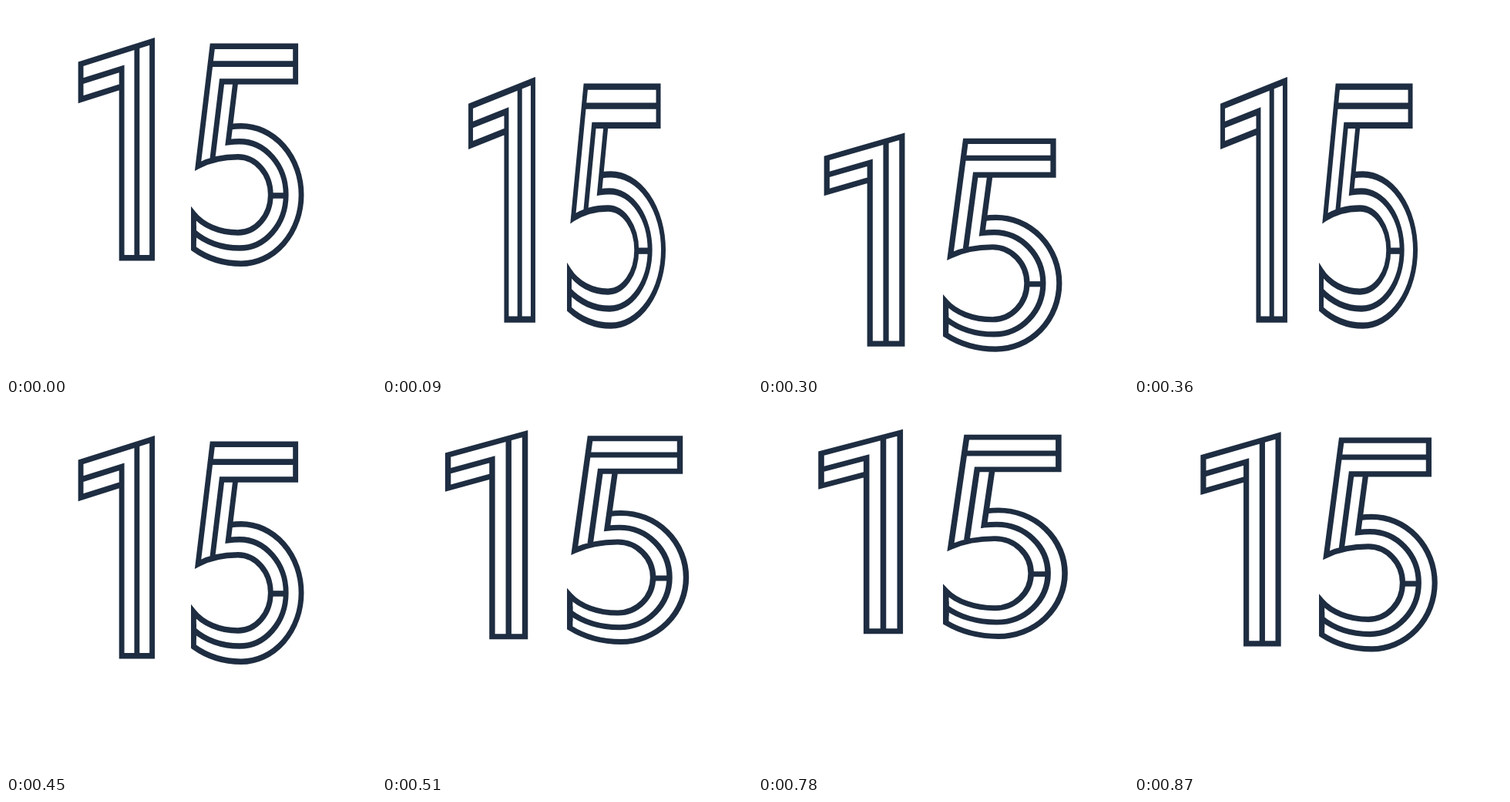
An HTML page with a canvas for the animation above (0.9 s loop, 480x480 px).

```html
<!DOCTYPE html>
<html lang="en">
<head>
<meta charset="utf-8">
<title>Bouncing 15</title>
<style>
  html, body { margin: 0; width: 100%; height: 100%; overflow: hidden; background: #fff; }
  canvas { display: block; }
</style>
</head>
<body>
<canvas id="stage" width="480" height="480"></canvas>
<script>
const ctx = document.getElementById('stage').getContext('2d');
const STEP = 30, STEPS = 30, IMPACT = 7.5;
const AXIS = 240, GROUND = 321, WIDTH = 308, HEIGHT = 284;
const FLAG_X = 89.7, ARM_X = 243.6, BAR_END = 382.6, FOOT = 310.4;

// Each digit is built from three parallel strokes, i = 0, 1, 2.
const stem = i => 145.5 + 20.75 * i;
const flag = (i, x) => 69.6 + 22 * i - 0.288 * (x - FLAG_X);
const bar = i => 47.7 + 21.8 * i;
const slant = (i, y) => 269.2 + 18.7 * i - 0.133 * (y - bar(0));

function polyline(...points) {
  for (const [x, y] of points) ctx.lineTo(x, y);
}

function stroke(trace) {
  ctx.beginPath();
  trace();
  ctx.stroke();
}

// Bowl of the 5: flat upper left, round right side, wide lower left.
function bowl(i, startX) {
  const cx = 304 + 2.2 * i, cy = 232, ry = 47 + 19.2 * i;
  const upper = 84 + 8 * i, right = 44.6 + 18.7 * i, lower = 70 + 17 * i;
  const top = -Math.PI / 2, bottom = Math.PI / 2;
  ctx.ellipse(cx, cy, upper, ry, 0, top - Math.asin((cx - startX) / upper), top);
  ctx.ellipse(cx, cy, right, ry, 0, top, bottom);
  ctx.ellipse(cx, cy, lower, ry, 0, bottom, bottom + Math.asin((cx - ARM_X) / lower));
}

function drawOne() {
  const [inner, middle, outer] = [0, 1, 2].map(stem);
  stroke(() => polyline(
    [inner, flag(2, inner)], [FLAG_X, flag(2, FLAG_X)], [FLAG_X, flag(0, FLAG_X)],
    [outer, flag(0, outer)], [outer, FOOT], [inner, FOOT],
    [inner, flag(1, inner)], [FLAG_X, flag(1, FLAG_X)]));
  stroke(() => polyline([middle, flag(0, middle)], [middle, FOOT]));
}

function drawFive() {
  const [top, middle, bottom] = [0, 1, 2].map(bar);
  stroke(() => {
    polyline([slant(1, 187), 187], [slant(1, bottom), bottom],
      [BAR_END, bottom], [BAR_END, top], [slant(0, top), top]);
    bowl(0, slant(0, 195.5));
    polyline([ARM_X, 290]);
  });
  stroke(() => {
    polyline([slant(2, bottom), bottom]);
    bowl(1, slant(2, 167));
  });
  stroke(() => {
    bowl(2, slant(2, 147));
    polyline([ARM_X, 270]);
  });
  stroke(() => polyline([slant(0, middle), middle], [BAR_END, middle]));
  stroke(() => polyline([348.6, 233], [369.5, 233]));
}

// d is the distance from impact in steps, the same on the way down and up.
function pose(d) {
  const fall = 1 / (1 + Math.exp(0.76 * (d - 5.86)));
  const squash = Math.exp(-d * d / 15.25);
  const width = 326 - 172 * fall + 214.6 * squash;
  return { width, height: 532.3 - 0.804 * width, bottom: 302.8 + 157.3 * fall };
}

function draw(time) {
  const step = Math.floor(time / STEP) % STEPS;
  const gap = Math.abs(step - IMPACT);
  const { width, height, bottom } = pose(Math.min(gap, STEPS - gap));
  const sx = width / WIDTH, sy = height / HEIGHT;

  ctx.setTransform(1, 0, 0, 1, 0, 0);
  ctx.fillStyle = '#fff';
  ctx.fillRect(0, 0, 480, 480);
  ctx.setTransform(sx, 0, 0, sy, AXIS * (1 - sx), bottom - GROUND * sy);
  ctx.strokeStyle = '#1e2d41';
  ctx.lineWidth = 7.2;
  drawOne();
  drawFive();
}

const start = performance.now();
function tick() {
  draw(performance.now() - start);
  requestAnimationFrame(tick);
}
tick();
</script>
</body>
</html>
```
